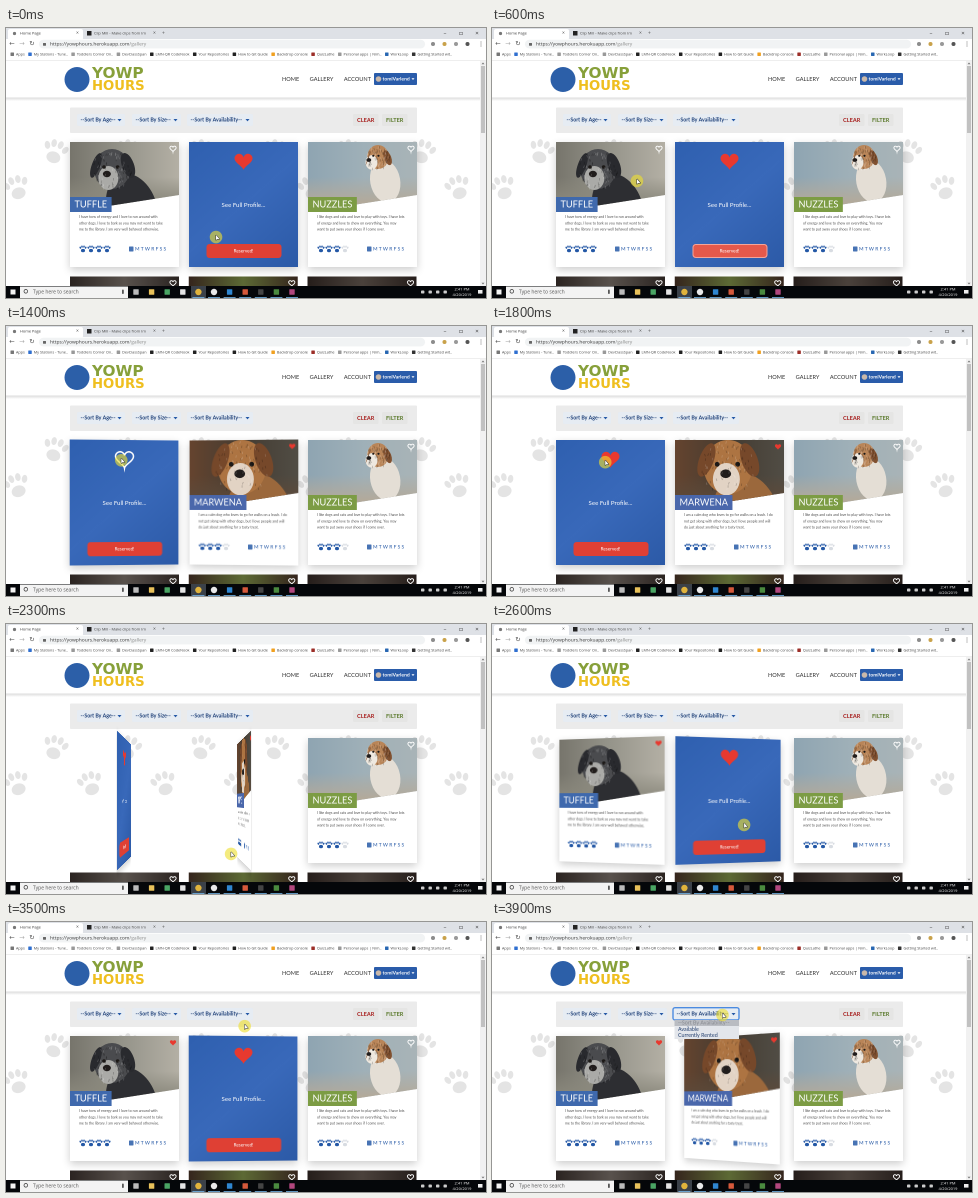
An HTML page with a canvas that plays this animation: 480 px wide and 270 px high, repeating every 4000 ms.

```html
<!DOCTYPE html>
<html lang="en">
<head>
<meta charset="utf-8">
<title>Dog gallery</title>
<style>
html, body { margin: 0; width: 480px; height: 270px; overflow: hidden; background: #fff; }
body { position: relative; }
canvas { position: absolute; left: 0; top: 0; }
.card { position: absolute; top: 114px; width: 109px; height: 125px; perspective: 500px; }
.card canvas { backface-visibility: hidden; box-shadow: 0 3px 8px rgba(0, 0, 0, .2); }
</style>
</head>
<body>
<script>
const LOOP = 4000, SCALE = 2, TAU = Math.PI * 2;
const CARD_W = 109, CARD_H = 125;
const cardX = i => 64 + i * 118.75;
const SANS = '"Open Sans", sans-serif';
const BLUE = '#2458a6', RED = '#e8392f';

function layer(parent, w, h) {
  const canvas = document.createElement('canvas');
  canvas.width = w * SCALE;
  canvas.height = h * SCALE;
  canvas.style.width = w + 'px';
  canvas.style.height = h + 'px';
  parent.append(canvas);
  const c = canvas.getContext('2d');
  c.scale(SCALE, SCALE);
  return c;
}

function rect(c, color, x, y, w, h, r = 0) {
  c.fillStyle = color;
  c.beginPath();
  c.roundRect(x, y, w, h, r);
  c.fill();
}

function frame(c, color, width, x, y, w, h, r = 0) {
  c.strokeStyle = color;
  c.lineWidth = width;
  c.beginPath();
  c.roundRect(x, y, w, h, r);
  c.stroke();
}

function oval(c, color, x, y, rx, ry = rx, turn = 0) {
  c.fillStyle = color;
  c.beginPath();
  c.ellipse(x, y, rx, ry, turn, 0, TAU);
  c.fill();
}

function line(c, color, width, ...pts) {
  c.strokeStyle = color;
  c.lineWidth = width;
  c.beginPath();
  for (let i = 0; i < pts.length; i += 2) c.lineTo(pts[i], pts[i + 1]);
  c.stroke();
}

function arrow(c, color, x, y, r, dir = 1) {
  c.fillStyle = color;
  c.beginPath();
  c.moveTo(x - r, y - r * dir / 2);
  c.lineTo(x + r, y - r * dir / 2);
  c.lineTo(x, y + r * dir * .7);
  c.fill();
}

// Draws a line of text and returns its width.
function text(c, str, x, y, size, color, { bold = 400, font = 'Lato, sans-serif', align = 'left' } = {}) {
  c.font = `${bold} ${size}px ${font}`;
  c.fillStyle = color;
  c.textAlign = align;
  c.textBaseline = 'middle';
  c.fillText(str, x, y);
  return c.measureText(str).width;
}

function gradient(c, x0, y0, x1, y1, ...colors) {
  const g = c.createLinearGradient(x0, y0, x1, y1);
  colors.forEach((color, i) => g.addColorStop(i / (colors.length - 1), color));
  return g;
}

function seeded(seed) {
  return () => (seed = seed * 16807 % 2147483647) / 2147483647;
}

function paw(c, x, y, size, color, turn = 0) {
  c.save();
  c.translate(x, y);
  c.rotate(turn);
  c.scale(size, size);
  for (let a = -.84; a < 1; a += .56) {
    oval(c, color, Math.sin(a) * .5, .15 - Math.cos(a) * .5, .11, .16, a / 2);
  }
  oval(c, color, 0, .22, .28, .23);
  c.restore();
}

function heart(c, x, y, size, liked) {
  const k = size / 32;
  c.beginPath();
  for (let a = 0; a < TAU; a += .1) {
    const rise = 13 * Math.cos(a) - 5 * Math.cos(2 * a) - 2 * Math.cos(3 * a) - Math.cos(4 * a);
    c.lineTo(x + k * 16 * Math.sin(a) ** 3, y - k * rise);
  }
  c.closePath();
  c.fillStyle = RED;
  c.strokeStyle = '#fff';
  c.lineWidth = .6 + size / 20;
  if (liked) c.fill(); else c.stroke();
}

const dogs = [
  { name: 'TUFFLE', plate: '#3f69ad', paws: 4,
    wall: ['#77756c', '#96958b', '#b4b0a5'], floor: '#8b897d',
    x: 42, y: 27, size: 20, face: -.3, lean: 1, coat: '#4a4b4e', ear: '#292a2e', muzzle: '#aaaaa7', body: '#2d2e32',
    bio: ['I have tons of energy and I love to run around with',
      'other dogs. I love to bark so you may not want to take',
      'me to the library. I am very well behaved otherwise.'] },
  { name: 'MARWENA', plate: '#4a67ab', paws: 3,
    wall: ['#65442f', '#443c32', '#514d45'], floor: '#5d4a3a',
    x: 53, y: 27, size: 27, face: -.1, lean: .7, coat: '#ad7442', ear: '#76482a', muzzle: '#e2d3c4', body: '#9b683c',
    bio: ['I am a calm dog who loves to go for walks on a leash. I do',
      'not get along with other dogs, but I love people and will',
      'do just about anything for a tasty treat.'] },
  { name: 'NUZZLES', plate: '#7c9c44', paws: 3,
    wall: ['#8fa5b2', '#9fb0b8', '#a9b4b7'], floor: '#b3aa9b',
    x: 70, y: 15, size: 12, face: -.9, lean: .6, coat: '#b98558', ear: '#80502f', muzzle: '#eee8df', body: '#e4ded5',
    bio: ['I like dogs and cats and love to play with toys. I have lots',
      'of energy and love to chew on everything. You may',
      'want to put away your shoes if I come over.'] },
];

// A soft portrait: body, head, muzzle and ears scaled from the head size.
function drawPhoto(c, { x, y, size: r, face, lean, wall, floor, coat, ear, muzzle, body }) {
  rect(c, gradient(c, 0, 0, CARD_W, 0, ...wall), 0, 0, CARD_W, 72);
  rect(c, gradient(c, 0, 35, 0, 60, floor + '00', floor), 0, 35, CARD_W, 37);
  oval(c, body, x + r * lean, y + r * 2, r * 1.25, r * 1.8, -lean * .3);
  oval(c, coat, x, y, r * .9, r);
  oval(c, muzzle, x + face * r * .6, y + r * .45, r * .5, r * .6);
  for (const side of [-1, 1]) {
    const turned = side * face > 0 ? 1 - Math.abs(face) : 1;
    oval(c, ear, x + side * r * .8, y - r * .3 - face * r * .4, r * .3 * turned, r * .65, -side * .35);
    oval(c, '#1c1917', x + (face * .4 + side * .4 * turned) * r, y - r * .1, r * .09);
  }
  oval(c, '#211d1c', x + face * r * .85, y + r * .25, r * .2, r * .16);
  const random = seeded(Math.round(x * 97));
  for (let i = 0; i < 90; i++) {
    const a = random() * TAU, d = Math.sqrt(random()) * r;
    const px = x + Math.cos(a) * d, py = y + Math.sin(a) * d;
    line(c, i % 2 ? 'rgba(255,255,255,.2)' : 'rgba(0,0,0,.25)', .7, px, py, px + random() * 2 - 1, py + 2.5);
  }
}

function drawFront(c, dog, liked) {
  rect(c, '#fff', 0, 0, CARD_W, CARD_H);
  c.save();
  c.beginPath();
  c.moveTo(0, 0);
  c.lineTo(CARD_W, 0);
  c.lineTo(CARD_W, 53);
  c.lineTo(0, 70);
  c.clip();
  drawPhoto(c, dog);
  c.restore();
  c.font = '400 9.2px Lato, sans-serif';
  rect(c, dog.plate, 0, 55, c.measureText(dog.name).width + 9, 15);
  text(c, dog.name, 4.5, 62.8, 9.2, '#fff');
  heart(c, 103, 6.5, 6.2, liked);
  dog.bio.forEach((row, i) => text(c, row, 9, 75 + i * 6.3, 3.55, '#4c4c4c'));
  for (let i = 0; i < 4; i++) paw(c, 13 + i * 8, 107, 7.2, i < dog.paws ? BLUE : '#d8dce2');
  rect(c, '#4773b4', 59, 104.5, 4.5, 5, .6);
  text(c, 'M T W R F S S', 65, 107.2, 4.9, BLUE);
}

function drawBack(c, liked, focused) {
  rect(c, gradient(c, 0, 0, CARD_W, CARD_H, '#2f60b0', '#3969ba', '#2c5aa7'), 0, 0, CARD_W, CARD_H);
  heart(c, 54.5, 18.5, 18, liked);
  text(c, 'See Full Profile...', 54.5, 63, 6.1, '#fff', { align: 'center' });
  rect(c, focused ? '#e4594b' : '#df4034', 17.5, 102, 75, 14, 3);
  if (focused) frame(c, '#f3a59a', 1, 18, 102.5, 74, 13, 3);
  text(c, 'Reserved!', 54.5, 109, 4.6, '#fff', { align: 'center' });
}

function drawBrowser(c) {
  const small = { font: SANS };
  rect(c, '#dee1e6', 0, 0, 480, 11);
  rect(c, '#fff', 2, 1, 75, 11, 2);
  oval(c, '#777', 8.5, 5.5, 1.6);
  text(c, 'Home Page', 14, 5.5, 3.9, '#333', small);
  rect(c, '#222', 81, 3, 4.5, 4.5);
  text(c, 'Clip Mill - Make clips from Im', 88, 5.5, 3.9, '#444', small);
  ['×', '×', '+'].forEach((mark, i) => text(c, mark, [70, 147, 156][i], 5.3, 5, '#555', small));
  ['–', '□', '×'].forEach((mark, i) => text(c, mark, 439 + i * 16, 5.3, 6, '#333', { align: 'center' }));

  rect(c, '#fff', 0, 11, 480, 22);
  ['←', '→', '↻'].forEach((mark, i) => {
    text(c, mark, 6 + i * 10, 16, 6.5, i === 1 ? '#aaa' : '#555', { font: '"DejaVu Sans", sans-serif', align: 'center' });
  });
  rect(c, '#f1f3f4', 33, 11.8, 386, 8.6, 4.3);
  rect(c, '#666', 37, 15, 3, 2.8, .5);
  const hostW = text(c, 'https://yowphours.herokuapp.com', 44, 16, 4.9, '#333', small);
  text(c, '/gallery', 44 + hostW, 16, 4.9, '#888', small);
  ['#8c8c8c', '#c9a24a', '#999', '#555'].forEach((color, i) => oval(c, color, 427 + i * 11.5, 16, 2));
  for (let y = 14; y < 19; y += 2) oval(c, '#555', 475, y, .5);

  const bookmarks = {
    'Apps': '#777', 'My Stations - Tune..': '#2f6fd0', 'Toddlers Corner On..': '#999', 'DevClassSpan': '#999',
    'LMN-QR CodeNook': '#222', 'Your Repositories': '#222', 'How to Git Guide': '#222', 'Backdrop console': '#f0a020',
    'QuizLathe': '#9c2e28', 'Personal apps | Nim..': '#999', 'WorkLoop': '#2867b2', 'Getting Started wit..': '#333',
  };
  let x = 10;
  for (const [label, color] of Object.entries(bookmarks)) {
    rect(c, color, x - 5.5, 24.5, 3.5, 3.5, .5);
    x += text(c, label, x, 26.4, 3.75, '#444', small) + 9;
  }
  line(c, '#ddd', .6, 0, 32.5, 480, 32.5);
}

function drawSelect(c, label, x, w) {
  rect(c, '#e6ecf3', x, 86, w, 12, 1.5);
  text(c, label, x + 3.5, 92, 5.2, '#1d3f78', { bold: 700 });
  arrow(c, BLUE, x + w - 5.5, 92, 2);
}

function drawPage(c) {
  rect(c, '#fff', 0, 33, 480, 225);
  for (let x = 11; x < 474; x += 73.5) {
    paw(c, x + 38, 124, 25, '#e4e4e4', .3);
    paw(c, x, 160, 25, '#e4e4e4', -.3);
  }
  rect(c, '#fff', 0, 33, 474, 37);
  rect(c, gradient(c, 0, 69.5, 0, 73, 'rgba(0,0,0,.14)', 'rgba(0,0,0,0)'), 0, 69.5, 474, 4);

  oval(c, '#2c5fa8', 71, 51.5, 12.5);
  const display = { bold: 700, font: '"DejaVu Sans", sans-serif' };
  text(c, 'YOWP', 86, 46, 15.3, '#87a03a', display);
  text(c, 'HOURS', 86, 58.5, 13.2, '#efbf1f', display);
  let x = 276;
  for (const label of ['HOME', 'GALLERY', 'ACCOUNT']) x += text(c, label, x, 51.3, 5.6, '#333') + 10.5;
  rect(c, '#2a5caa', 368, 45, 43, 12, 1);
  oval(c, '#c9b8aa', 372.5, 51, 2.8);
  text(c, 'tomiVarlend', 376.5, 51, 5, '#fff', { bold: 700 });
  arrow(c, '#fff', 407, 51, 1.5);

  rect(c, '#ebebeb', 64, 79.5, 347, 25.5, 1);
  drawSelect(c, '--Sort By Age--', 71, 48);
  drawSelect(c, '--Sort By Size--', 126, 49);
  drawSelect(c, '--Sort By Availability--', 181, 66);
  [['CLEAR', '#a8201f'], ['FILTER', '#5b7a2c']].forEach(([label, color], i) => {
    const left = 347 + i * 29;
    rect(c, '#e5e5e4', left, 86, 25.5, 12, 1.5);
    text(c, label, left + 12.7, 92.2, 5.6, color, { bold: 700, align: 'center' });
  });

  [['#2b2421', '#59524d'], ['#35251d', '#5d6a35'], ['#261e1b', '#4b423c']].forEach(([dark, mid], i) => {
    const left = cardX(i);
    rect(c, gradient(c, left, 0, left + CARD_W, 0, dark, mid, dark), left, 248.5, CARD_W, 10);
    heart(c, left + 103, 255, 6.2, false);
  });

  rect(c, '#f1f1f1', 474, 33, 6, 225);
  rect(c, '#c1c1c1', 475, 38, 4, 67);
  arrow(c, '#777', 477, 35.5, 1.5, -1);
  arrow(c, '#777', 477, 255.5, 1.5);
}

function drawTaskbar(c) {
  rect(c, '#05070a', 0, 258, 480, 12);
  rect(c, '#f4f4f4', 4.5, 261.5, 5, 5);
  rect(c, '#f3f3f3', 14, 258.5, 108, 11.5);
  frame(c, '#333', .7, 18, 261.5, 3.6, 3.6, 1.8);
  text(c, 'Type here to search', 27, 264, 5, '#555', { font: SANS });
  rect(c, '#555', 116, 261.5, 1.8, 4.5, .9);
  rect(c, '#3b4149', 185, 258, 15, 12);
  const icons = ['#bbb', '#e8c15a', '#4aa564', '#e4e4e4', '#e0b33c', '#e9e9e9', '#2f86d0', '#d5593b', '#444', '#4a8a3f', '#b2477e'];
  icons.forEach((color, i) => {
    const x = 130 + i * 15.6;
    if (i === 4 || i === 5) oval(c, color, x, 264, 3.2);
    else rect(c, color, x - 2.7, 261.3, 5.4, 5.4, .5);
    if (i > 3) rect(c, '#76b9ed', x - 6, 269.2, 12, .8);
  });
  for (let x = 415; x < 440; x += 7.5) rect(c, '#ccc', x, 262.5, 3.4, 3, .8);
  ['2:41 PM', '4/20/2019'].forEach((row, i) => {
    text(c, row, 456, 261.7 + i * 5.3, 4, '#fff', { font: SANS, align: 'center' });
  });
  rect(c, '#eee', 472, 262, 4.5, 3.6);
}

function drawMenu(c) {
  frame(c, '#4b8be0', 1.4, 181, 85.7, 66, 12.3, 2);
  rect(c, '#e3e6eb', 182.5, 98, 64.5, 19);
  rect(c, '#b9bcc2', 182.5, 98, 64.5, 6);
  ['--Sort By Availability--', 'Available', 'Currently Rented'].forEach((label, i) => {
    text(c, label, 186, 101 + i * 6.2, 5.3, i ? '#24406f' : '#85888f');
  });
}

function drawCursor(c, [x, y]) {
  oval(c, 'rgba(238, 222, 48, .62)', x, y, 6.3);
  const tip = [x, y - 2, x, y + 3, x + 1.3, y + 2, x + 3.4, y + 2, x, y - 2];
  c.lineJoin = 'round';
  line(c, '#333', 1, ...tip);
  c.fillStyle = '#fff';
  c.fill();
}

// Solves the curve cubic-bezier(.25, .1, .25, 1) for progress at time u.
function ease(u) {
  if (u <= 0) return 0;
  if (u >= 1) return 1;
  const bezier = (s, a, b) => 3 * a * s * (1 - s) ** 2 + 3 * b * s * s * (1 - s) + s ** 3;
  let lo = 0, hi = 1;
  for (let i = 0; i < 20; i++) {
    const s = (lo + hi) / 2;
    if (bezier(s, .25, .25) < u) lo = s; else hi = s;
  }
  return bezier(lo, .1, 1);
}

// Time, x, y of the pointer.
const path = [
  [0, 210, 209], [250, 213, 218], [600, 145, 153], [1100, 117, 133], [1800, 113, 136],
  [2300, 225, 230], [2900, 279, 172], [3600, 232, 93], [LOOP, 230, 93],
];

function cursorAt(t) {
  const i = path.findIndex(key => key[0] > t);
  const a = path[i - 1], b = path[i];
  const u = (t - a[0]) / (b[0] - a[0]);
  return [1, 2].map(k => a[k] + (b[k] - a[k]) * u);
}

const page = layer(document.body, 480, 270);
drawPage(page);
drawBrowser(page);
drawTaskbar(page);

const cards = dogs.map((dog, i) => {
  const box = document.createElement('div');
  box.className = 'card';
  box.style.left = cardX(i) + 'px';
  document.body.append(box);
  return { dog, front: layer(box, CARD_W, CARD_H), back: layer(box, CARD_W, CARD_H) };
});
const overlay = layer(document.body, 480, 270);

function render(t) {
  const turn = start => ease((t - start) / 800);
  const first = turn(760) - turn(2082);
  const flips = [first, 1 - first - turn(3470), 0];
  const liked = [t >= 1500, true, false];
  const focused = t >= 250 && t < 1500;
  cards.forEach(({ dog, front, back }, i) => {
    const angle = -180 * flips[i];
    drawFront(front, dog, liked[i]);
    drawBack(back, liked[i], focused && i === 1);
    front.canvas.style.transform = `rotateY(${angle}deg)`;
    back.canvas.style.transform = `rotateY(${angle + 180}deg)`;
  });
  overlay.clearRect(0, 0, 480, 270);
  if (t >= 3700) drawMenu(overlay);
  drawCursor(overlay, cursorAt(t));
}

const begin = performance.now();
function tick() {
  render((performance.now() - begin) % LOOP);
  requestAnimationFrame(tick);
}
tick();
</script>
</body>
</html>
```
